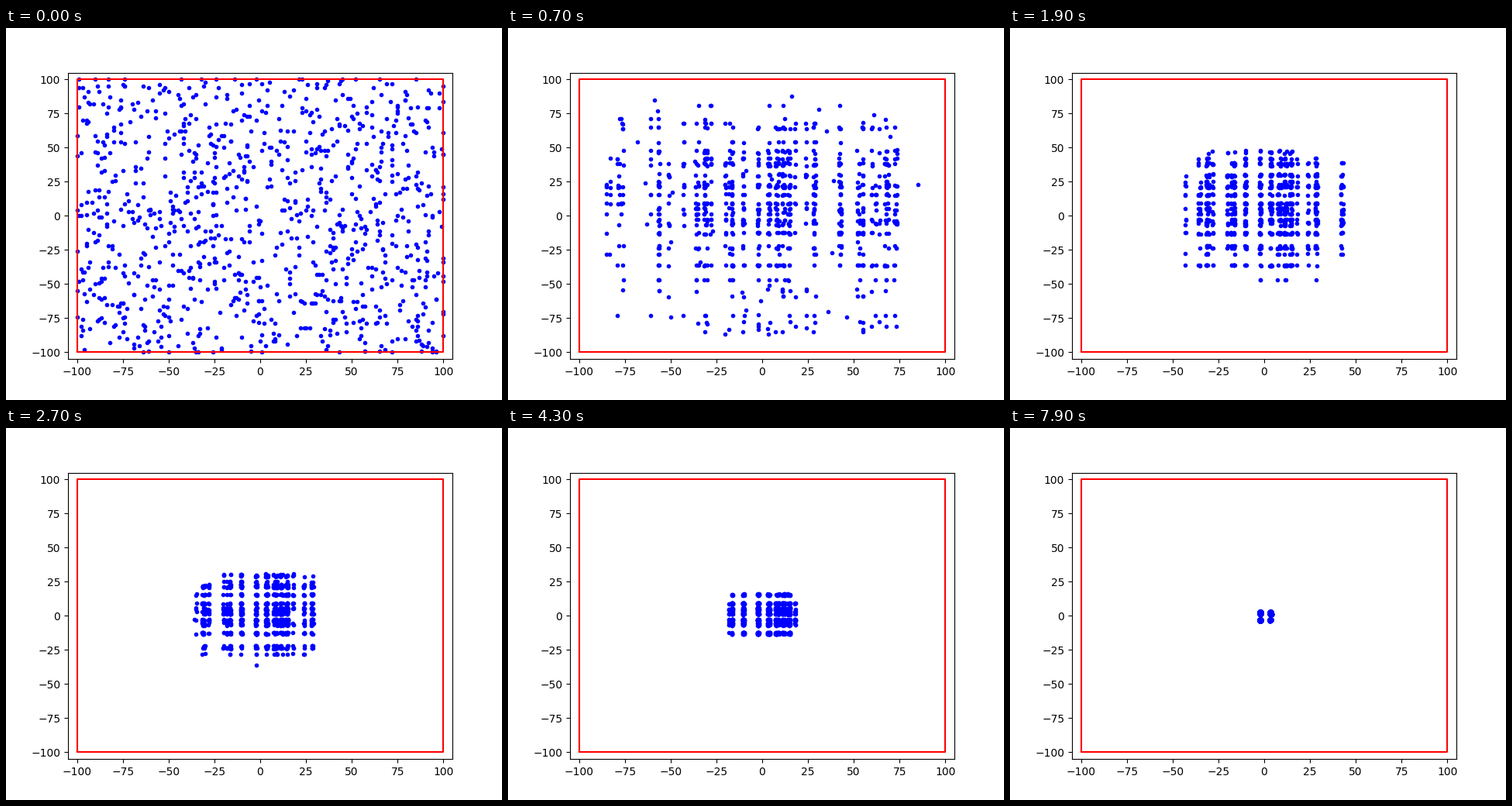
Write a matplotlib script that moves like this. It is 640 by 480 pixels and loops after 8 s.

```python
import numpy as np
import matplotlib.pyplot as plt
from matplotlib.animation import FuncAnimation

FRAMES, STEP = 80, 100
POPULATION = 1000
TURNOVER = 0.35   # share of the population replaced each generation
MUTATION = 0.25

# Dominant coordinates; weaker ones are random.
COL_KEYS = [-57, -31, -17, -10, -2, 3, 8, 12, 15, 28, 43, 73]
ROW_KEYS = [-36, -23, -13, -6, -3.7, 2, 5, 9, 16, 21, 30, 39]


def reach(t):
    """Half extent of the living region at t seconds."""
    return np.interp(t, [0, 0.8, 1.9, 2.7, 4.3, 5.9, 7.9],
                     [104, 91, 49, 36, 19.5, 13, 4.2])


def cost(x, y, t):
    """Rounded-square distance: above 1 is outside the living region."""
    return (x ** 4 + y ** 4) / reach(t) ** 4


def gene_pool(rng, keys):
    """Three close variants of each key, plus scattered outer values."""
    strong = np.repeat(keys, 3) + rng.uniform(-1, 1, 3 * len(keys))
    weak = rng.integers(18, 88, 28) * rng.choice([-1, 1], 28)
    return np.concatenate([strong, weak])


def breed(rng, cols, rows, count, t):
    """Cross columns with rows, favouring low cost, with a slight mutation."""
    x, y = (g.ravel() for g in np.meshgrid(cols, rows))
    weight = np.clip(1 - cost(x, y, t), 0, None)
    pick = rng.choice(weight.size, count, p=weight / weight.sum())
    mutation = rng.uniform(-MUTATION, MUTATION, (count, 2))
    return np.column_stack([x[pick], y[pick]]) + mutation


def evolve(seed=7):
    rng = np.random.default_rng(seed)
    cols, rows = gene_pool(rng, COL_KEYS), gene_pool(rng, ROW_KEYS)
    points = rng.uniform(-102, 102, (POPULATION, 2)).round().clip(-100, 100)
    history = [points]
    for i in range(1, FRAMES):
        t = i * STEP / 1000
        points = points.copy()
        dead = cost(points[:, 0], points[:, 1], t) > 1
        dead |= rng.random(POPULATION) < TURNOVER
        points[dead] = breed(rng, cols, rows, dead.sum(), t)
        history.append(points)
    return history


history = evolve()

fig, ax = plt.subplots(figsize=(6.4, 4.8), dpi=100)
ax.set(xlim=(-105, 105), ylim=(-105, 105))
dots, = ax.plot([], [], "b.", ms=6)
ax.plot([-100, 100, 100, -100, -100], [-100, -100, 100, 100, -100], "r", lw=1.5)


def draw(i):
    dots.set_data(*history[i].T)
    return dots,


anim = FuncAnimation(fig, draw, frames=FRAMES, interval=STEP,
                     repeat=True, repeat_delay=0)
plt.show()
```
